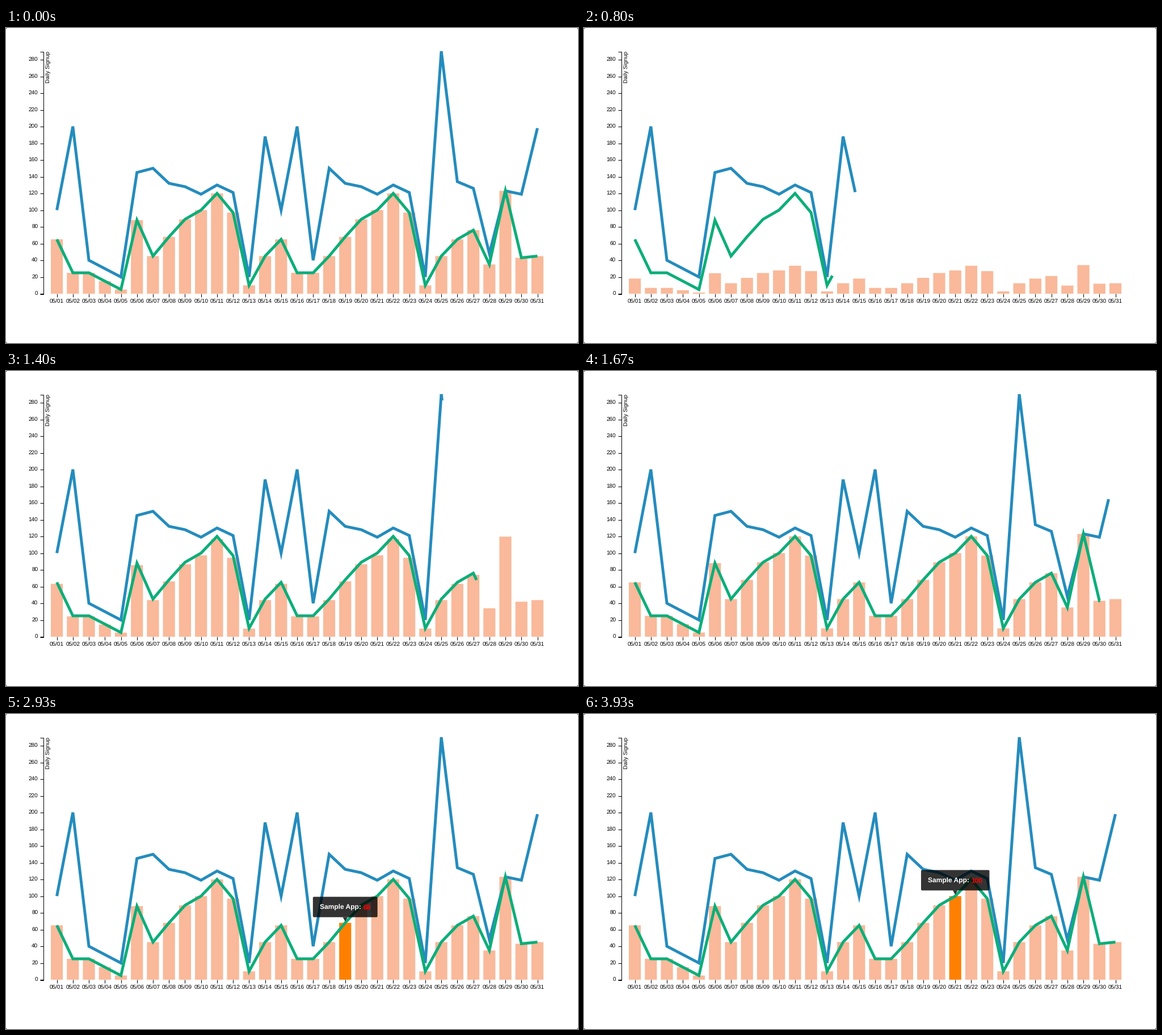
Write a matplotlib script that moves like this. It is 1008 by 556 pixels and loops after 3990 ms.

```python
import numpy as np
import matplotlib.pyplot as plt
from matplotlib.animation import FuncAnimation
from matplotlib.patches import FancyBboxPatch, Polygon, Rectangle

W, H, DPI = 1008, 556, 64
PX = 72 / DPI                      # points per pixel
LOOP, TICK, RATE = 3990, 30, 15    # ms, ms, drawn steps per second

BASE, TOP, PEAK = 469, 41, 290
X0, STEP, BAR_W = 89.6, 28.23, 21.2
AXIS_X = 65.5

BLUE, GREEN = "#248cbd", "#0cae79"
PEACH, HOT = "#f9b99a", "#ff8000"

RESET, LINE_START, GROW = 183, 190, 1500
# start time in ms and index of the hovered bar
HOVERS = [(1990, 18), (3260, 19), (3590, 20)]

VISITS = [100, 200, 40, 30, 20, 145, 150, 132, 128, 119, 130, 121, 20, 188,
          100, 200, 40, 150, 132, 128, 119, 130, 121, 20, 290, 134, 126, 48,
          123, 119, 198]
SIGNUPS = [65, 25, 25, 15, 5, 88, 45, 68, 89, 100, 120, 97, 10, 45, 65, 25,
           25, 45, 68, 89, 100, 120, 97, 10, 45, 65, 76, 35, 123, 43, 45]

plt.rcParams["font.family"] = "Liberation Sans"
plt.rcParams["text.hinting"] = "none"


def ypos(value):
    return BASE - np.asarray(value) * (BASE - TOP) / PEAK


def cubic_in_out(p):
    return 4 * p**3 if p < 0.5 else 1 - 4 * (1 - p)**3


def progress(t, start):
    return min(max((t - start) / GROW, 0), 1)


xs = X0 + STEP * np.arange(len(SIGNUPS))

fig = plt.figure(figsize=(W / DPI, H / DPI), dpi=DPI, facecolor="#555555")
ax = fig.add_axes([0, 0, 1, 1])
ax.set_xlim(0, W)
ax.set_ylim(H, 0)
ax.axis("off")


def label(x, y, text, size=10, **kw):
    return ax.text(x, y, text, fontsize=size * PX, va="baseline", **kw)


def rule(x, y):
    ax.plot(x, y, color="black", lw=PX, solid_capstyle="butt", zorder=2)


class GrowingLine:
    """Polyline drawn up to a fraction of its length."""

    def __init__(self, values, color, zorder):
        self.x, self.y = xs, ypos(values)
        seg = np.hypot(np.diff(self.x), np.diff(self.y))
        self.run = np.concatenate([[0], np.cumsum(seg)])
        self.art, = ax.plot([], [], color=color, lw=5 * PX, zorder=zorder,
                            solid_capstyle="butt", solid_joinstyle="miter")

    def draw(self, part):
        if part <= 0:
            self.art.set_data([], [])
            return
        end = part * self.run[-1]
        n = np.searchsorted(self.run, end - 1e-6)
        tip = [np.interp(end, self.run, c) for c in (self.x, self.y)]
        self.art.set_data(np.append(self.x[:n], tip[0]),
                          np.append(self.y[:n], tip[1]))


class Tooltip:
    PAD, HEIGHT, GAP = 12, 36, 10
    DARK = (0, 0, 0, 0.8)

    def __init__(self):
        self.box = FancyBboxPatch((0, 0), 1, 1, fc=self.DARK, ec="none",
                                  boxstyle="round,pad=0,rounding_size=2",
                                  zorder=6)
        self.arrow = Polygon(np.zeros((3, 2)), fc=self.DARK, ec="none",
                             zorder=6)
        ax.add_patch(self.box)
        ax.add_patch(self.arrow)
        self.name = label(0, 0, "Sample App:", 12, weight="bold",
                          color="white", zorder=7)
        self.count = label(0, 0, "", 12, weight="bold", color="red",
                           ha="right", zorder=7)
        self.parts = [self.box, self.arrow, self.name, self.count]

    def draw(self, bar):
        for part in self.parts:
            part.set_visible(bar is not None)
        if bar is None:
            return
        text = str(SIGNUPS[bar])
        width = 2 * self.PAD + 76.5 + 6.67 * len(text)
        x, bottom = xs[bar], float(ypos(SIGNUPS[bar])) - self.GAP
        left, top = x - width / 2, bottom - self.HEIGHT
        self.box.set_bounds(left, top, width, self.HEIGHT)
        self.arrow.set_xy([(x - 4.2, bottom), (x + 4.2, bottom),
                           (x, bottom + 7.5)])
        self.name.set_position((left + self.PAD, bottom - 13.8))
        self.count.set_text(text)
        self.count.set_position((left + width - self.PAD, bottom - 13.8))


# window with slightly rounded corners
ax.add_patch(FancyBboxPatch((0, 0), W, H, fc="white", ec="none", zorder=0,
                            boxstyle="round,pad=0,rounding_size=3"))

# axes
rule([AXIS_X - 6, AXIS_X, AXIS_X, AXIS_X - 6], [TOP + .5, TOP + .5, BASE + .5, BASE + .5])
for v in range(0, PEAK, 20):
    y = float(ypos(v))
    rule([AXIS_X - 6, AXIS_X], [y + .4, y + .4])
    label(56.3, y + 3.4, str(v), ha="right")
for day, x in enumerate(xs, 1):
    rule([x, x], [BASE, BASE + 6])
    label(x, 485.2, f"05/{day:02d}", ha="center")
label(77.4, 40.6, "Daily Signup", ha="right", rotation=90,
      rotation_mode="anchor")

bars = [ax.add_patch(Rectangle((x - BAR_W / 2, BASE), BAR_W, 0, fc=PEACH,
                               ec="none", snap=False, zorder=1)) for x in xs]
lines = [GrowingLine(VISITS, BLUE, 3), GrowingLine(SIGNUPS, GREEN, 4)]
tooltip = Tooltip()


def update(i):
    t = int((i * TICK + 25) * RATE / 1000) * 1000 / RATE
    fresh = t < RESET
    grown = 1 if fresh else cubic_in_out(progress(t, RESET))
    drawn = 1 if fresh else progress(t, LINE_START)
    hover = None
    for start, bar in HOVERS:
        if t >= start:
            hover = bar
    for n, (bar, value) in enumerate(zip(bars, SIGNUPS)):
        bar.set_height(float(ypos(value * grown)) - BASE)
        bar.set_facecolor(HOT if n == hover else PEACH)
    for line in lines:
        line.draw(drawn)
    tooltip.draw(hover)
    return []


anim = FuncAnimation(fig, update, frames=LOOP // TICK, interval=TICK,
                     repeat=True, repeat_delay=0, blit=False)
plt.show()
```
